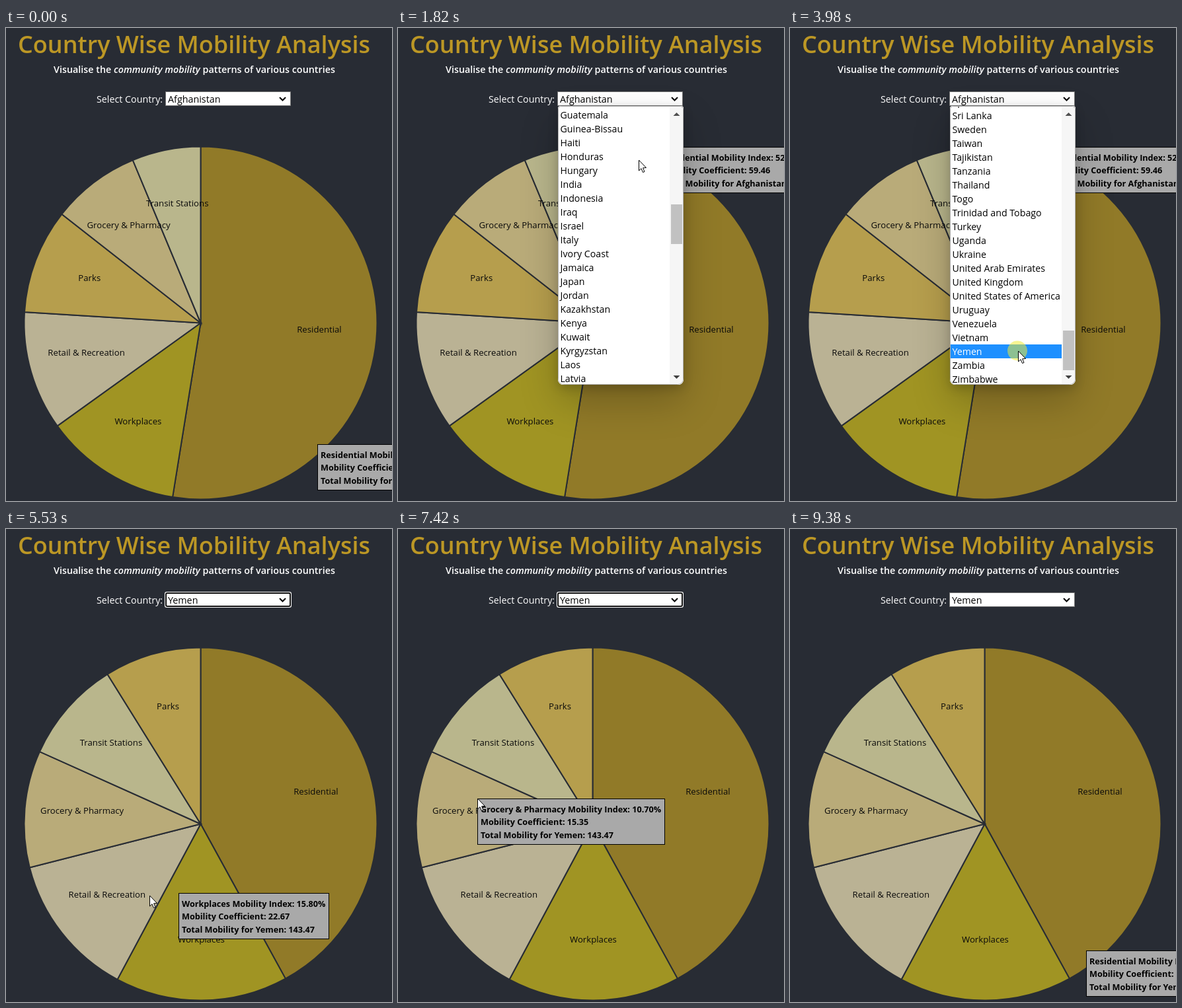
Animation, 584 px wide and 716 px high, one loop 9.45 s. Source, as an HTML page with a canvas:

```html
<!DOCTYPE html>
<html lang="en">
<head>
<meta charset="utf-8">
<title>Country Wise Mobility Analysis</title>
<style>
html, body { margin: 0; width: 100%; height: 100%; overflow: hidden; background: #282c34; }
canvas { display: block; }
</style>
</head>
<body>
<canvas id="stage" width="584" height="716"></canvas>
<script>
const ctx = document.getElementById('stage').getContext('2d');
const LOOP = 9450, OPEN = 1150, PICK = 4050, BLUR = 9380;
const BG = '#282c34', FAMILY = '"Open Sans", "Noto Sans", sans-serif';
const CX = 294.5, CY = 446.5, RADIUS = 266, LABEL_RADIUS = 180;
const ROW = 21, MAX_SCROLL = 2246;

const COLORS = {
  'Residential': '#917a28', 'Workplaces': '#a09423', 'Retail & Recreation': '#bab294',
  'Parks': '#b69e4d', 'Grocery & Pharmacy': '#b9ab79', 'Transit Stations': '#b9b68c'
};
const AFGHANISTAN = { name: 'Afghanistan', total: 113.17, slices: [
  ['Residential', 52.54], ['Workplaces', 12.54], ['Retail & Recreation', 10.9],
  ['Parks', 9.6], ['Grocery & Pharmacy', 8.14], ['Transit Stations', 6.28]] };
const YEMEN = { name: 'Yemen', total: 143.47, slices: [
  ['Residential', 42.02], ['Workplaces', 15.8], ['Retail & Recreation', 13.2],
  ['Grocery & Pharmacy', 10.7], ['Transit Stations', 9.42], ['Parks', 8.86]] };

const COUNTRIES = `Afghanistan,Angola,Antigua and Barbuda,Argentina,Aruba,Australia,Austria,Bahrain,
Bangladesh,Barbados,Belarus,Belgium,Belize,Benin,Bolivia,Bosnia and Herzegovina,Botswana,Brazil,Bulgaria,
Burkina Faso,Cambodia,Cameroon,Canada,Cape Verde,Chile,Colombia,Costa Rica,Croatia,Czechia,Denmark,
Dominican Republic,Ecuador,Egypt,El Salvador,Estonia,Fiji,Finland,France,Gabon,Georgia,Germany,Ghana,Greece,
Guatemala,Guinea-Bissau,Haiti,Honduras,Hungary,India,Indonesia,Iraq,Israel,Italy,Ivory Coast,Jamaica,Japan,
Jordan,Kazakhstan,Kenya,Kuwait,Kyrgyzstan,Laos,Latvia,Lebanon,Libya,Lithuania,Luxembourg,Malaysia,Mali,Malta,
Mauritius,Mexico,Moldova,Mongolia,Morocco,Mozambique,Myanmar,Namibia,Nepal,Netherlands,New Zealand,Nicaragua,
Niger,Nigeria,North Macedonia,Norway,Oman,Pakistan,Panama,Papua New Guinea,Paraguay,Peru,Philippines,Poland,
Portugal,Qatar,Romania,Rwanda,Saudi Arabia,Senegal,Serbia,Singapore,Slovakia,Slovenia,South Africa,South Korea,
Spain,Sri Lanka,Sweden,Taiwan,Tajikistan,Tanzania,Thailand,Togo,Trinidad and Tobago,Turkey,Uganda,Ukraine,
United Arab Emirates,United Kingdom,United States of America,Uruguay,Venezuela,Vietnam,Yemen,Zambia,Zimbabwe`
  .split(',').map(name => name.trim());

// Keyframes: time, then values
const MOUSE = [[120, 460, 645], [480, 425, 430], [820, 384, 195], [1080, 350, 109], [1220, 350, 109],
  [1490, 364, 200], [3000, 364, 200], [3560, 345, 489], [4710, 345, 489], [4920, 256, 548],
  [5060, 277, 566], [5390, 277, 566], [5460, 250, 566], [5530, 217, 555], [5940, 132, 540],
  [6470, 132, 540], [6600, 113, 482], [6670, 106, 467], [6950, 99, 435], [7290, 99, 435],
  [7700, 164, 350], [7910, 146, 332], [8440, 146, 332], [8580, 437, 653], [8590, 600, 800]];
const SCROLL = [[1290, 0], [1490, 714], [1690, 714], [1820, 903], [2000, 1000], [2300, 1000],
  [2600, 1420], [2800, 1500], [3200, MAX_SCROLL]];

function at(keys, t) {
  const next = keys.findIndex(key => key[0] > t);
  if (next < 0) return keys[keys.length - 1].slice(1);
  if (next === 0) return keys[0].slice(1);
  const a = keys[next - 1], b = keys[next], k = (t - a[0]) / (b[0] - a[0]);
  return a.slice(1).map((v, i) => v + (b[i + 1] - v) * k);
}

function text(str, x, y, font, color = '#000', align = 'left') {
  ctx.font = `${font} ${FAMILY}`;
  ctx.fillStyle = color;
  ctx.textAlign = align;
  ctx.fillText(str, x, y);
  return ctx.measureText(str).width;
}

function box(x, y, w, h, color) {
  ctx.fillStyle = color;
  ctx.fillRect(x, y, w, h);
}

function shape(points, fill) {
  ctx.beginPath();
  points.forEach(([x, y]) => ctx.lineTo(x, y));
  ctx.closePath();
  ctx.fillStyle = fill;
  ctx.fill();
}

function drawHeader(country, focused) {
  text('Country Wise Mobility Analysis', 284.5, 38, '600 36px', '#bc9725', 'center');
  let x = 72;
  x += text('Visualise the ', x, 68, '600 14.35px', '#fff');
  x += text('community mobility', x, 68, 'italic 600 14.35px', '#fff');
  text(' patterns of various countries', x, 68, '600 14.35px', '#fff');
  text('Select Country:', 137, 112.5, '14.3px', '#fff');

  if (focused) {
    ctx.beginPath();
    ctx.roundRect(240, 95, 192, 24, 3);
    ctx.fillStyle = '#fff';
    ctx.fill();
    ctx.beginPath();
    ctx.roundRect(242, 97, 188, 20, 2);
    ctx.strokeStyle = '#101010';
    ctx.lineWidth = 2;
    ctx.stroke();
  } else {
    box(241, 96, 190, 22, '#767676');
    box(242, 97, 188, 20, '#fff');
  }
  text(country.name, 245, 112.5, '14.3px');
  ctx.beginPath();
  ctx.moveTo(414, 105);
  ctx.lineTo(418.5, 109.5);
  ctx.lineTo(423, 105);
  ctx.strokeStyle = '#000';
  ctx.lineWidth = 2;
  ctx.stroke();
}

function drawPie({ slices }) {
  const labels = [];
  let start = 0;
  ctx.strokeStyle = BG;
  ctx.lineWidth = 2;
  for (const [name, percent] of slices) {
    const end = start + percent / 50 * Math.PI, mid = (start + end) / 2;
    ctx.beginPath();
    ctx.moveTo(CX, CY);
    ctx.arc(CX, CY, RADIUS + 1, start - Math.PI / 2, end - Math.PI / 2);
    ctx.closePath();
    ctx.fillStyle = COLORS[name];
    ctx.fill();
    ctx.stroke();
    labels.push([name, CX + LABEL_RADIUS * Math.sin(mid), CY - LABEL_RADIUS * Math.cos(mid)]);
    start = end;
  }
  for (const [name, x, y] of labels) text(name, x, y, '13.2px', '#0a0a0a', 'center');
}

const overPie = ([x, y]) => Math.hypot(x - CX, y - CY) < RADIUS + 1;

// The tooltip trails the mouse and stays where the mouse last touched the pie
function drawTooltip(country, t) {
  let s = t - 70;
  while ((s >= OPEN && s < PICK - 70) || !overPie(at(MOUSE, s))) s -= 10;
  const [mx, my] = at(MOUSE, s);
  const turn = (Math.atan2(mx - CX, CY - my) / (2 * Math.PI) + 1) % 1 * 100;
  let sum = 0;
  const [name, percent] = country.slices.find(slice => (sum += slice[1]) > turn);
  const lines = [
    `${name} Mobility Index: ${percent.toFixed(2)}%`,
    `Mobility Coefficient: ${(percent * country.total / 100).toFixed(2)}`,
    `Total Mobility for ${country.name}: ${country.total.toFixed(2)}`
  ];
  const font = 'bold 12.65px';
  ctx.font = `${font} ${FAMILY}`;
  const width = Math.round(Math.max(...lines.map(line => ctx.measureText(line).width)) + 11);
  const x = Math.round(mx + 11), y = Math.round(my - 15);
  box(x, y, width, 70, '#000');
  box(x + 1, y + 1, width - 2, 68, '#a9a9a9');
  lines.forEach((line, i) => text(line, x + 5, y + 20.5 + i * 19.7, font));
}

function drawList(t) {
  const [scroll] = at(SCROLL, t), mouseY = at(MOUSE, t)[1];
  ctx.save();
  ctx.beginPath();
  ctx.roundRect(242, 118, 190, 422, [4, 4, 8, 8]);
  ctx.fillStyle = '#fff';
  for (const [offset, blur, alpha] of [[25.6, 57.6, 0.22], [4.8, 14.4, 0.18]]) {
    ctx.shadowColor = `rgba(0,0,0,${alpha})`;
    ctx.shadowBlur = blur;
    ctx.shadowOffsetY = offset;
    ctx.fill();
  }
  ctx.shadowColor = 'transparent';
  ctx.clip();

  const top = 121 - scroll;
  const active = t > 3200 ? Math.floor((mouseY - top) / ROW) : 0;
  COUNTRIES.forEach((name, i) => {
    const y = top + i * ROW;
    if (y < 90 || y > 545) return;
    if (i === active) box(243, Math.round(y), 168, ROW, '#1e90ff');
    text(name, 245.5, y + 16.2, '14.2px', i === active ? '#fff' : '#000');
  });

  box(411, 119, 20, 420, '#f6f6f6');
  box(413, Math.round(138 + scroll / MAX_SCROLL * 320), 17, 60, '#c1c1c1');
  shape([[416.5, 133], [426.5, 133], [421.5, 128]], '#505050');
  shape([[416.5, 526], [426.5, 526], [421.5, 531]], '#404040');
  ctx.beginPath();
  ctx.roundRect(242.5, 118.5, 189, 421, [4, 4, 8, 8]);
  ctx.strokeStyle = '#b0b0b0';
  ctx.lineWidth = 1;
  ctx.stroke();
  ctx.restore();
}

function drawMouse(t) {
  const [x, y] = at(MOUSE, t);
  if ((t >= 1080 && t < 1290) || (t >= 3840 && t < PICK)) {
    ctx.beginPath();
    ctx.arc(x - 1, y - 0.5, 15, 0, 7);
    ctx.fillStyle = 'rgba(240,235,50,.53)';
    ctx.fill();
  }
  ctx.save();
  ctx.translate(Math.round(x), Math.round(y));
  if (t >= 7910 && t < 8510) {
    box(0, -7, 1, 15, '#222');
    box(-3, -8, 3, 1, '#222');
    box(1, -8, 3, 1, '#222');
    box(-3, 8, 3, 1, '#222');
    box(1, 8, 3, 1, '#222');
  } else {
    shape([[0.5, 0], [0.5, 16], [4, 12.7], [6.5, 18.5], [9, 17.5], [6.6, 11.8], [11.5, 11.5]], '#fff');
    ctx.strokeStyle = '#000';
    ctx.lineWidth = 1;
    ctx.stroke();
  }
  ctx.restore();
}

function draw(now) {
  const t = Math.floor(now % LOOP / 10) * 10;
  const country = t < PICK ? AFGHANISTAN : YEMEN;
  box(0, 0, 584, 716, BG);
  drawHeader(country, t >= PICK && t < BLUR);
  drawPie(country);
  drawTooltip(country, t);
  if (t >= OPEN && t < PICK) drawList(t);
  if (t >= 190 && t < 8650) drawMouse(t);
}

const begin = performance.now();
function frame() {
  draw(performance.now() - begin);
  requestAnimationFrame(frame);
}
frame();
</script>
</body>
</html>
```
